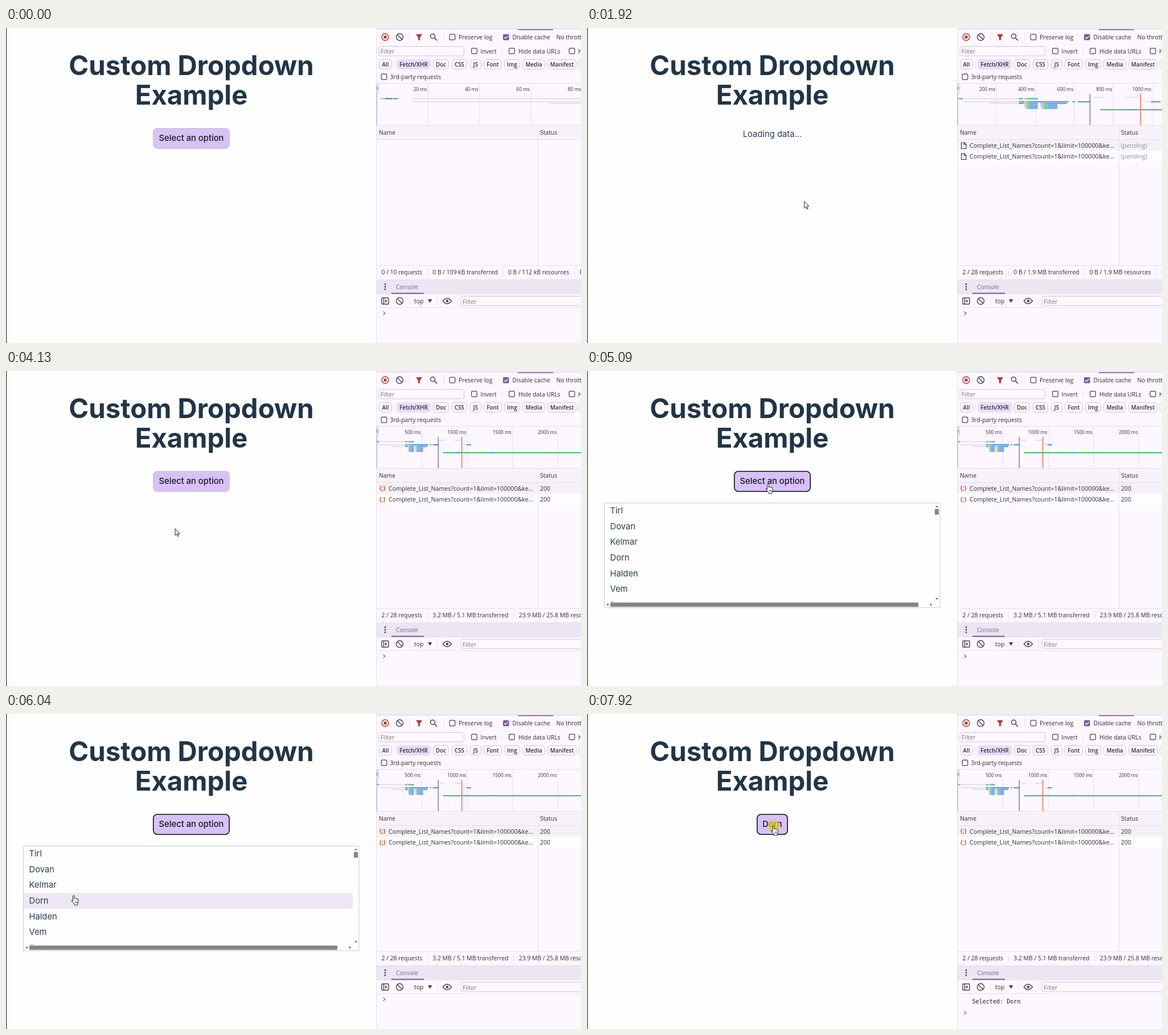
An HTML page for the animation above (8000 ms loop, 1010x555 px).

```html
<!DOCTYPE html>
<html lang="en">
<head>
<meta charset="utf-8">
<title>Custom Dropdown Example</title>
<style>
  html, body { margin: 0; width: 100%; height: 100%; overflow: hidden; background: #fefefe; }
  svg { position: absolute; left: 0; top: 0; }
  text { white-space: pre; }
  .page { font: 400 14.78px Inter, sans-serif; fill: #2a3d4f; }
  .label { font: 500 14.78px Inter, sans-serif; fill: #1c1822; text-anchor: middle; }
  .title { font: 700 47.35px Inter, sans-serif; fill: #213547; text-anchor: middle; }
  .mid { text-anchor: middle; }
  .tool { font: 400 10.4px "Open Sans", sans-serif; fill: #302c36; }
  .chip { font: 600 9.8px "Open Sans", sans-serif; fill: #302c36; text-anchor: middle; }
  .tick { font: 400 8.4px "Open Sans", sans-serif; fill: #302c36; text-anchor: end; }
  .json { font: 700 10.5px "Open Sans", sans-serif; fill: #d2622f; }
  .mono { font: 400 10.08px "DejaVu Sans Mono", monospace; fill: #1f1b24; }
  #summary { position: absolute; left: 651px; top: 418px; width: 359px; height: 24px; overflow: hidden;
    display: flex; align-items: center; font: 400 10.4px "Open Sans", sans-serif; color: #302c36; }
  #summary span { flex: none; padding: 0 8.5px; white-space: nowrap; line-height: 13px; }
  #summary span + span { border-left: 1px solid #e6d9f2; }
</style>
</head>
<body>
<svg id="fixed" width="1010" height="555"></svg>
<svg id="live" width="1010" height="555"></svg>
<div id="summary"></div>
<script>
const LOOP = 8000, CENTER = 325.5;
const INK = '#46414c', EDGE = '#e9dcf5', PURPLE = '#7b57a5', RED = '#b3372a';
const $ = id => document.getElementById(id);

const text = (x, y, s, cls = 'tool', extra = '') => `<text x="${x}" y="${y}" class="${cls}" ${extra}>${s}</text>`;
const rect = (x, y, w, h, fill, extra = '') => `<rect x="${x}" y="${y}" width="${w}" height="${h}" fill="${fill}" ${extra}/>`;
const path = (d, fill, stroke = 'none', width = 1, extra = '') =>
  `<path d="${d}" fill="${fill}" stroke="${stroke}" stroke-width="${width}" ${extra}/>`;
const circle = (x, y, r, fill, stroke = 'none', width = 1.4) =>
  `<circle cx="${x}" cy="${y}" r="${r}" fill="${fill}" stroke="${stroke}" stroke-width="${width}"/>`;
const vline = (x, top, bottom, color = EDGE, w = 1) => rect(x, top, w, bottom - top, color);
const hline = (y, x = 650) => rect(x, y, 1010 - x, 1, EDGE);
const round = (r, stroke) => `rx="${r}" stroke="${stroke}"`;
const box = (x, y) => rect(x - 4.8, y - 4.8, 9.6, 9.6, 'none', round(1.5, INK) + ' stroke-width="1.2"');
const clearIcon = (x, y) => circle(x, y, 6, 'none', INK) + path(`M${x - 4.2} ${y - 4.2}l8.4 8.4`, 'none', INK, 1.4);

function fixedParts() {
  let s = rect(0, 0, 1, 555, '#111') + rect(650, 0, 360, 555, '#fdf7ff');
  s += rect(650, 0, 360, 3, '#ece6f2') + rect(899, 2, 62, 1.6, PURPLE);

  // Network toolbar
  s += circle(666, 16, 6, 'none', RED) + rect(663.5, 13.5, 5, 5, RED) + clearIcon(691.5, 16);
  s += path('M720 11h11l-4 5.5v5h-3v-5z', RED);
  s += circle(749.5, 14.5, 4, 'none', INK, 1.5) + path('M752.5 17.5l4.5 4.5', 'none', INK, 1.7);
  s += vline(708.5, 9, 23) + vline(768.5, 9, 23);
  s += box(784, 16) + text(795, 20, 'Preserve log');
  s += rect(873, 11, 10.5, 10.5, PURPLE, 'rx="1.5"') + path('M875.3 16.2l2.2 2.3 4-4.4', 'none', '#fff', 1.4);
  s += text(889.5, 20, 'Disable cache') + text(966.5, 20, 'No throttling');

  // Filter row
  s += rect(655, 32.5, 149.5, 16.5, '#fff8ff', round(3, '#cfc4d8')) + text(658, 45, 'Filter', 'tool', 'fill-opacity=".65"');
  s += box(822.5, 40.5) + text(833.5, 45, 'Invert') + vline(871, 34, 47);
  s += box(888.5, 40.5) + text(900, 45, 'Hide data URLs') + box(994, 40.5) + text(1005, 45, 'Hide');
  const chips = [['All', 655, 678], ['Fetch/XHR', 686, 746], ['Doc', 750, 778], ['CSS', 783, 810], ['JS', 815, 835],
    ['Font', 839, 871], ['Img', 875, 903], ['Media', 907, 947], ['Manifest', 951, 1002], ['', 1006, 1040]];
  for (const [label, a, b] of chips) {
    const on = label === 'Fetch/XHR';
    s += rect(a + .5, 55.5, b - a - 1, 17, on ? '#eadcf9' : 'none', round(5, on ? '#eadcf9' : '#cfc4d8'));
    s += text((a + b) / 2, 67.8, label, 'chip');
  }
  s += vline(681.5, 57, 71) + box(664, 86) + text(674.5, 90, '3rd-party requests') + hline(97);

  // Request table, summary bar, console
  s += rect(650, 172, 360, 25, '#f8f2fb') + hline(171) + hline(196);
  s += text(655, 188, 'Name') + text(938, 188, 'Status') + hline(418);
  s += rect(650, 443, 360, 25, '#ece6f2') + hline(443) + hline(468) + hline(492);
  for (const y of [451.5, 456, 460.5]) s += circle(666, y, 1.4, INK);
  s += text(685, 460, 'Console', 'tool', 'style="fill:#77619a"') + rect(677, 466.5, 57, 2, PURPLE);
  s += rect(660, 475.5, 12, 11, 'none', round(1, INK) + ' stroke-width="1.4"');
  s += path('M663.5 475.5v11', 'none', INK, 1.4) + path('M666 478.3l3.5 2.7-3.5 2.7z', INK);
  s += clearIcon(691.5, 481) + vline(708.5, 474, 488) + text(717, 485, 'top') + path('M741 478h7.5l-3.75 6z', INK);
  s += vline(757.5, 474, 488) + vline(792, 474, 488);
  s += path('M767.5 481q7.5-9.5 15 0q-7.5 9.5-15 0z', 'none', INK, 1.4) + circle(775, 481, 2.2, INK);
  s += rect(799, 472.5, 230, 16.5, '#fff8ff', round(3, '#cfc4d8')) + text(802, 485.5, 'Filter', 'tool', 'fill-opacity=".65"');
  return s + vline(650, 0, 555);
}

// Linear track through [time, ...values] points
function track(points, t) {
  const i = points.findIndex(p => p[0] > t);
  if (i < 0) return points[points.length - 1].slice(1);
  if (i === 0) return points[0].slice(1);
  const a = points[i - 1], b = points[i], k = (t - a[0]) / (b[0] - a[0]);
  return a.slice(1).map((v, n) => v + (b[n + 1] - v) * k);
}

const SPAN = [[0, 79.5], [69, 79.5], [70, 120], [230, 240], [620, 472], [960, 1050], [2999, 1050], [3000, 1808], [3790, 2255]];
const POINTER = [[1290, 420, 323], [1640, 382, 305.5], [1920, 382, 305.5], [2200, 317, 288.5], [2400, 317.5, 289],
  [2730, 318.5, 289], [3000, 318.5, 289], [3790, 300, 286], [4130, 297, 278], [4560, 318, 199], [5290, 318, 199],
  [5560, 164, 265.5], [5850, 130, 292], [6040, 119, 319.5], [6110, 116.5, 333], [6520, 116.5, 333], [6860, 327, 198],
  [7389, 327, 198], [7390, 327.5, 197]];

const COLORS = { blue: '#4a92ee', green: '#3fc35f', wait: '#e5dfe7', grey: '#b7b2b9', dark: '#3f7d6a' };
const EARLY = [[124.5, 1.5, 3, 'grey'], [124.5, 3.2, 6.2, 'dark'], [124.5, 6.4, 8.4, 'blue'],
  [124.5, 13.7, 99, 'wait'], [130, 13.7, 99, 'wait'], [132.8, 67, 99, 'wait']];
const BARS = [[124.5, 3, 8, 'grey'], [124.5, 8, 16, 'green'], [124.5, 16, 28, 'blue'], [124.5, 33, 314, 'wait'],
  [124.5, 314, 322, 'green'], [124.5, 322, 335, 'blue'], [124.5, 340, 357, 'grey'], [124.5, 357, 380, 'green'],
  [124.5, 380, 412, 'blue'], [130, 34, 314, 'wait'], [130, 314, 322, 'green'], [130, 322, 342, 'blue'],
  [130, 342, 357, 'grey'], [130, 357, 380, 'green'], [130, 380, 570, 'blue'], [130, 590, 603, 'blue'],
  [130, 618, 680, 'blue'], [132.8, 163, 314, 'wait'], [132.8, 314, 340, 'blue'], [122, 697, 753, 'wait'],
  [122, 860, 943, 'wait'], [130, 960, 990, 'wait'], [130, 993, 1043, 'blue'], [144, 733, 9999, 'green'],
  [144, 859, 914, 'blue'], [144, 1247, 1297, 'blue']];
for (let i = 0; i < 4; i++) {
  const y = 132.8 + i * 2.8;
  BARS.push([y, 340 + i * 3, 360, 'grey'], [y, 360, 371, 'green'], [y, 371, 412, 'blue'],
    [y, 424 + i * 2, 443, 'grey'], [y, 443, 460, 'green'], [y, 460, i ? 512 : 560, 'blue']);
}

function timeline(t) {
  const [span] = track(SPAN, t), scale = 359 / span, at = ms => 651 + ms * scale;
  const step = [20, 50, 100, 200, 500].find(n => n * scale >= 64);
  let s = '';
  for (let ms = step; at(ms) < 1060; ms += step)
    s += vline(at(ms) - .5, 98, 171) + text(at(ms) - 2, 111, ms + ' ms', 'tick');
  for (const [y, a, b, color] of t < 70 ? EARLY : BARS)
    if (a < span) s += rect(at(a), y - 1, Math.max(1.5, (Math.min(b, span) - a) * scale), 2, COLORS[color]);
  if (span > 950) s += vline(at(680) - .7, 116, 171, '#8778a8', 1.5) + vline(at(940) - .7, 116, 171, '#e5735a', 1.5);
  return s + vline(650.5, 98, 171, '#c8b2e8', 1.5)
    + rect(650.5, 98.5, 4, 15, '#f3eafb', round(2, '#d2c0ea')) + vline(651.5, 103, 109, PURPLE);
}

function requests(t) {
  let s = '';
  if (t >= 490) [3000, 3790].forEach((done, i) => {
    const y = 197 + i * 19.3, ready = t >= done;
    s += rect(651, y, 359, 19.3, i ? '#fefdff' : '#f6f1f9');
    s += ready ? text(655.5, y + 13.3, '{;}', 'json')
      : path(`M657.5 ${y + 5}h5.5l3 3v7.3h-8.5zM662.5 ${y + 5}v3.5h3.5`, 'none', INK, 1.2);
    s += text(672, y + 14, 'Complete_List_Names?count=1&amp;limit=100000&amp;ke...', 'tool', 'style="font-size:10.65px"');
    s += text(938, y + 14, ready ? '200' : '(pending)', 'tool', ready ? '' : 'style="fill:#8f8a94"');
  });
  return s + vline(934, 172, 418);
}

const size = mb => mb < 1 ? (mb < .1 ? (mb * 1000).toFixed(1) : Math.round(mb * 1000)) + ' kB' : mb.toFixed(1) + ' MB';
const COUNTS = [[0, 0, 10, .109, .112], [70, 0, 12, .178, .182], [230, 0, 17, .612, .62], [430, 0, 25, 1.8, 1.8], [490, 2, 28, 1.9, 1.9]];

function summary(t) {
  const [, shown, total, sent, res] = COUNTS.filter(c => c[0] <= t).pop();
  let got = '0 B', have = '0 B', all = sent, full = res;
  if (t >= 3000) {
    const k = Math.min(1, Math.floor((t - 3000) / 72) / 12);
    got = size(.0329 + 3.1671 * k);
    have = size(.237 + 23.663 * k);
    all = 1.9 + 3.2 * k;
    full = 2.1 + 23.7 * k;
  }
  return [`${shown} / ${total} requests`, `${got} / ${size(all)} transferred`, `${have} / ${size(full)} resources`, 'Finish: 1.0 s']
    .map(s => `<span>${s}</span>`).join('');
}

const NAMES = ['Tirl', 'Dovan', 'Kelmar', 'Dorn', 'Halden', 'Vem', 'Fexter'];
const ROW = 27.65, LIST_TOP = 232.5;

function dropdown(hovered) {
  let s = rect(30.5, LIST_TOP, 589.5, 184.5, '#fefefe', 'stroke="#ccc"');
  if (hovered >= 0) s += rect(31, LIST_TOP + hovered * ROW, 578, ROW, '#ede7f5');
  s += '<clipPath id="rows"><path d="M31 233h578v173.500h-578z"/></clipPath><g clip-path="url(#rows)">';
  NAMES.forEach((name, i) => s += text(40.5, 251 + i * ROW, name, 'page'));
  s += '</g>' + rect(611, 243, 7, 10, '#858585') + rect(41, 408, 541, 7.5, '#858585');
  return s + path('M612 240l2.5-3 2.5 3zM612 400l2.5 3 2.5-3zM37.5 409l-3 2.5 3 2.5zM603 409l3 2.5-3 2.5z', '#666');
}

const ARROW = 'M0 0V12l2.8-2.6 1.8 4.2 1.8-.8-1.8-4.1h3.6z';
const HAND = 'M-1.4 10V1.3a1.3 1.3 0 0 1 2.6 0V6a1.2 1.2 0 0 1 2.4 .2a1.2 1.2 0 0 1 2.3 .5' +
  'a1.1 1.1 0 0 1 2.1 .8V11.5q0 2-1.4 3.5V17H1.2V15.3Q-.8 13.5-3.8 9.6q-.2-1.7 1.1-1.3z';

function page(t) {
  if (t >= 360 && t < 490) return '';
  let s = text(CENTER, 82.6, 'Custom Dropdown', 'title') + text(CENTER, 134.6, 'Example', 'title');
  const hasButton = t < 360 || t >= 3860, open = t >= 5090 && t < 6250, picked = t >= 6250;
  const width = picked ? 55 : 135, left = CENTER - width / 2;
  const [x, y] = track(POINTER, t);
  const row = open && x > 31 && x < 609 && y >= LIST_TOP && y < 407 ? Math.floor((y - LIST_TOP) / ROW) : -1;

  if (hasButton) {
    const line = t >= 5020 ? 1.6 : 1;
    s += rect(left + line / 2, 176 + line / 2, width - line, 37 - line, '#d6c2f7',
      round(7, t >= 5020 ? '#111' : '#cdc3d6') + ` stroke-width="${line}"`);
    s += text(CENTER, 199.3, picked ? NAMES[3] : 'Select an option', 'label');
  } else s += text(CENTER, 192, 'Loading data...', 'page mid');
  if (open) s += dropdown(row);

  if (t >= 1290) {
    const clicking = [[5020, 5090], [6180, 6380], [7850, LOOP]].some(([a, b]) => t >= a && t < b);
    if (clicking) s += `<g opacity=".74">${circle(x + .5, y + .5, 10.5, '#dfd02f')}</g>`;
    const onButton = hasButton && x > left && x < left + width && y > 176 && y < 213;
    const hand = onButton || row >= 0, place = `transform="translate(${x} ${y})"`;
    s += path(hand ? HAND : ARROW, '#fff', '#222', 1, place);
    if (hand) s += path('M2.5 10v4M4.3 10v4M6 10v4', 'none', '#444', .7, place);
  }
  return s;
}

function consoleOutput(t) {
  const logged = t >= 6250, y = logged ? 526.6 : 502.6;
  return (logged ? text(676.5, 510, 'Selected: ' + NAMES[3], 'mono') : '')
    + path(`M662.5 ${y - 3}l3.5 3-3.5 3`, 'none', '#625b70', 1.2);
}

const drawn = {};
function show(id, markup) {
  if (drawn[id] !== markup) $(id).innerHTML = drawn[id] = markup;
}

function frame(now) {
  const t = now % LOOP;
  show('live', timeline(t) + requests(t) + consoleOutput(t) + page(t));
  show('summary', summary(t));
  requestAnimationFrame(frame);
}

show('fixed', fixedParts());
frame(0);
</script>
</body>
</html>
```
